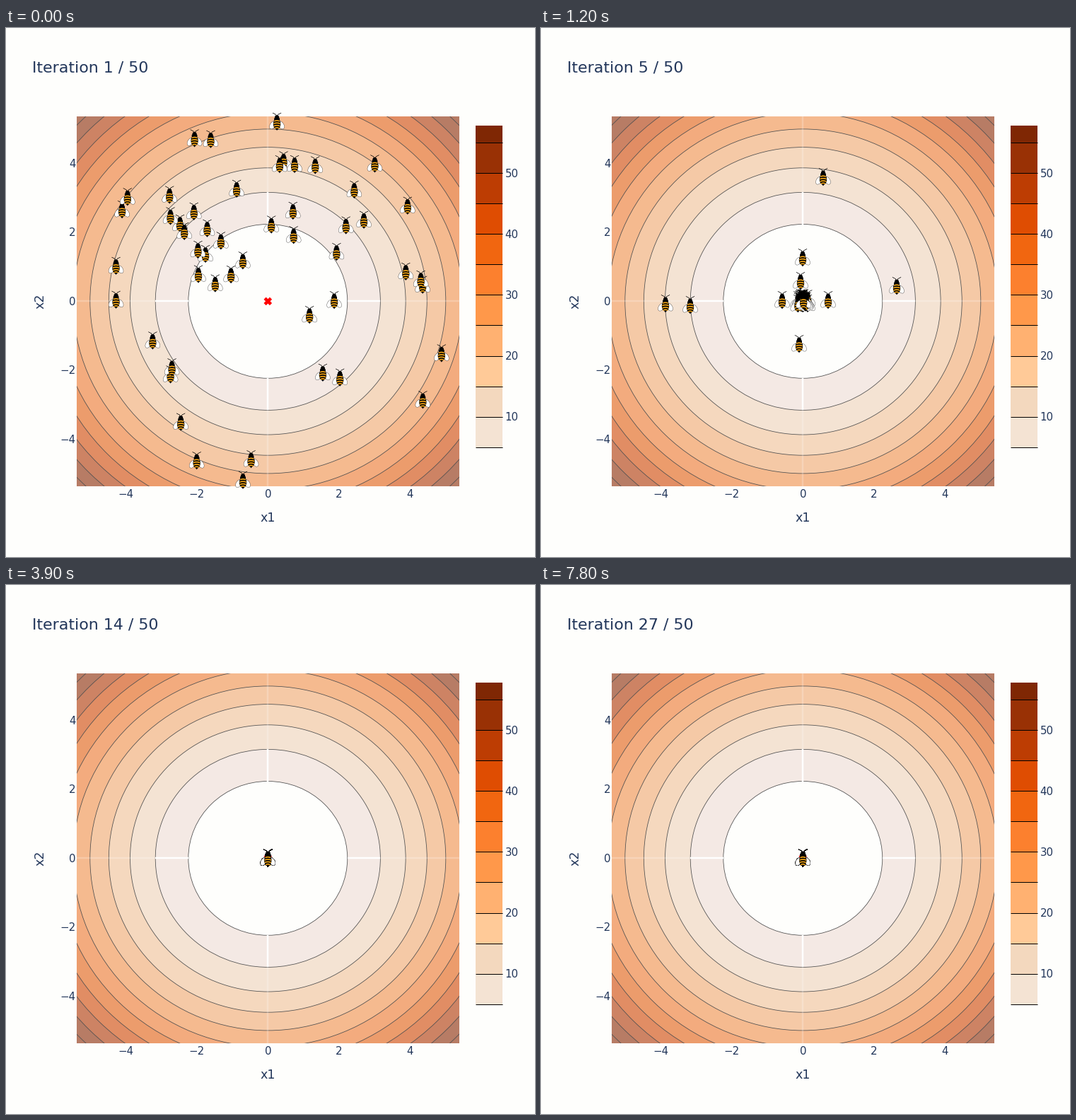
These frames come from a looping animation (748x748 px, 8000 ms). A matplotlib script:

```python
import matplotlib.pyplot as plt
import numpy as np
from matplotlib.animation import FuncAnimation
from matplotlib.collections import PolyCollection
from matplotlib.colors import to_rgb
from matplotlib.patches import Ellipse, Rectangle

SIZE = 748
PT = 0.72  # points per pixel at 100 dpi
INK = "#22365a"
PAPER = "#fefefc"
CENTER = np.array([370.3, 386.4])
UNIT = np.array([50.3, 48.7])  # pixels per axis unit
LEFT, TOP, RIGHT, BOTTOM = 100, 125, 641, 648
BAR_LEFT, BAR_RIGHT = 664, 702

BAND_COLORS = ["#fee7d8", "#feddbc", "#ffca98", "#ffb171", "#ff984a", "#fc802e",
               "#f16610", "#df4d02", "#bd3d03", "#993105", "#7f2704"]
BAR_COLORS = ["#f4e3d3", "#f3d8be"] + BAND_COLORS[2:]

# Bees start scattered, then each coordinate jumps to the core at its own iteration.
COUNT = 50
rng = np.random.default_rng(7)
angle = rng.normal(2.3, 1.7, COUNT)
radius = 5.3 * np.sqrt(rng.uniform(0.03, 1, COUNT))
START = CENTER + np.column_stack([np.cos(angle), -np.sin(angle)]) * radius[:, None] * UNIT
ARRIVAL = rng.choice([2, 3, 4], size=(COUNT, 2), p=[0.4, 0.35, 0.25])
JITTER = np.clip(rng.normal(size=(COUNT, 2)), -1.8, 1.8) * (1, 0.6)

# A few bees wait at these places before the last jump
WAITING = np.array([(399, 211), (503, 365), (176, 390), (211, 392), (341, 385),
                    (406, 385), (365, 447), (370, 325), (367, 358)])
ARRIVAL[:len(WAITING)] = rng.integers(6, 8, size=WAITING.shape)


def swarm(iteration):
    """Bee centres at an iteration."""
    spread = 20 * 0.72 ** iteration if iteration < 14 else 0
    places = START.copy()
    if iteration >= 3:
        places[:len(WAITING)] = WAITING
    return np.where(iteration < ARRIVAL, places, CENTER + JITTER * spread)


def oval(x, y, rx, ry, tilt=0.0):
    t = np.linspace(0, 2 * np.pi, 25)
    u, v = rx * np.cos(t), ry * np.sin(t)
    c, s = np.cos(tilt), np.sin(tilt)
    return np.column_stack([x + u * c - v * s, y + u * s + v * c])


def stripe(y, half, height):
    x = np.linspace(-half, half, 9)
    arch = y + (x / half) ** 2
    return np.column_stack([np.r_[x, x[::-1]], np.r_[arch, (arch + height)[::-1]]])


def antenna(side):
    line = np.array([(0.6, -8.5), (2, -10.6), (4, -11.5), (6, -12.6)]) * (side, 1)
    return np.vstack([line, line[::-1]])


def bee_parts():
    """(outline, fill, edge, edge width) from back to front."""
    parts = [(antenna(s), "none", "black", 0.35) for s in (-1, 1)]
    parts += [(oval(6 * s, 4.6, 3.7, 6.1, -0.55 * s), "white", "black", 0.3)
              for s in (-1, 1)]
    abdomen = oval(0, 3, 5.2, 7.8)
    abdomen[6] = 0, 12.3  # sting
    for shape in (abdomen, oval(0, -3.8, 4, 3.4), oval(0, -6.6, 3, 2.8)):
        parts.append((shape, "black", "none", 0))
    for y, half in ((-2.6, 3.8), (0.8, 4.7), (4.2, 4.5), (7.4, 3.1)):
        parts.append((stripe(y, half, 1.7), "#f7a816", "none", 0))
    return parts


def label(x, y, text, size, ha="center"):
    """Text whose digits are centred vertically on y."""
    return ax.text(x, y + 0.365 * size, text, size=size * PT, color=INK, ha=ha,
                   va="baseline", family="DejaVu Sans")


def line(xs, ys, color, width, **kw):
    ax.plot(xs, ys, color=color, lw=width * PT, solid_capstyle="butt", **kw)


def draw_contours():
    backdrop = np.array(to_rgb("#e5ecf6"))
    fills = [0.6 * np.array(to_rgb(c)) + 0.4 * backdrop for c in BAND_COLORS[:-1]]
    frame = Rectangle((LEFT, TOP), RIGHT - LEFT, BOTTOM - TOP, fc=fills[-1], ec="none")
    ax.add_patch(frame)
    for level, fill in zip(range(55, 0, -5), [fills[-1]] + fills[-2::-1] + [PAPER]):
        disc = Ellipse(CENTER, *(2 * np.sqrt(level) * UNIT), fc=fill, ec="#505050",
                       lw=0.8 * PT)
        ax.add_patch(disc)
        disc.set_clip_path(frame)

    # Zero lines: bright in the innermost ring, faint outside it
    inner, outer = np.sqrt(5) * UNIT, np.sqrt(10) * UNIT
    for axis, edges in enumerate(((LEFT, RIGHT), (TOP, BOTTOM))):
        fixed = [CENTER[1 - axis]] * 2
        for side, edge in zip((-1, 1), edges):
            near, far = (CENTER[axis] + side * r[axis] for r in (inner, outer))
            for span, alpha in (((near, far), 1), ((far, edge), 0.22)):
                xs, ys = (span, fixed) if axis == 0 else (fixed, span)
                line(xs, ys, "white", 2.5, alpha=alpha)


def draw_colorbar():
    def height(value):
        return 549.7 - (value - 10) * 8.615

    for i, color in enumerate(BAR_COLORS):
        low = 5 + 5 * i
        high = min(low + 5, 57.8)
        ax.add_patch(Rectangle((BAR_LEFT, height(high)), BAR_RIGHT - BAR_LEFT,
                               height(low) - height(high), fc=color, ec="none"))
        line((BAR_LEFT, BAR_RIGHT), [height(low)] * 2, "black", 1)
    for value in range(10, 60, 10):
        label(705.5, height(value), str(value), 15, ha="left")


def draw_axes_text():
    for v in range(-4, 5, 2):
        text = str(v).replace("-", "\u2212")
        label(CENTER[0] + v * UNIT[0], 659, text, 15)
        label(98.5, CENTER[1] - v * UNIT[1], text, 15, ha="right")
    label(370, 692, "x1", 17.5)
    ax.text(53.5, CENTER[1], "x2", size=17.5 * PT, color=INK, rotation=90, ha="center",
            va="baseline", rotation_mode="anchor", family="DejaVu Sans")


fig = plt.figure(figsize=(SIZE / 100, SIZE / 100), dpi=100, facecolor=PAPER)
ax = fig.add_axes([0, 0, 1, 1])
ax.set_xlim(0, SIZE)
ax.set_ylim(SIZE, 0)
ax.axis("off")

draw_contours()
draw_colorbar()
draw_axes_text()
arm = np.array([-4.2, 4.2])
for slope in (-1, 1):
    line(CENTER[0] + arm, CENTER[1] + slope * arm, "red", 4.5, zorder=3)
title = label(37.3, 54.7, "", 22.1, ha="left")

shapes, faces, borders, widths = zip(*bee_parts())
bees = PolyCollection([], facecolors=faces, edgecolors=borders,
                      linewidths=[w * PT for w in widths], zorder=4)
ax.add_collection(bees, autolim=False)


def update(frame):
    iteration = frame // 3 + 1  # each iteration holds for 300 ms
    title.set_text(f"Iteration {iteration} / 50")
    bees.set_verts([shape + place for place in swarm(iteration) for shape in shapes])
    return title, bees


animation = FuncAnimation(fig, update, frames=80, interval=100, repeat=True,
                          repeat_delay=0, blit=False)
plt.show()
```
